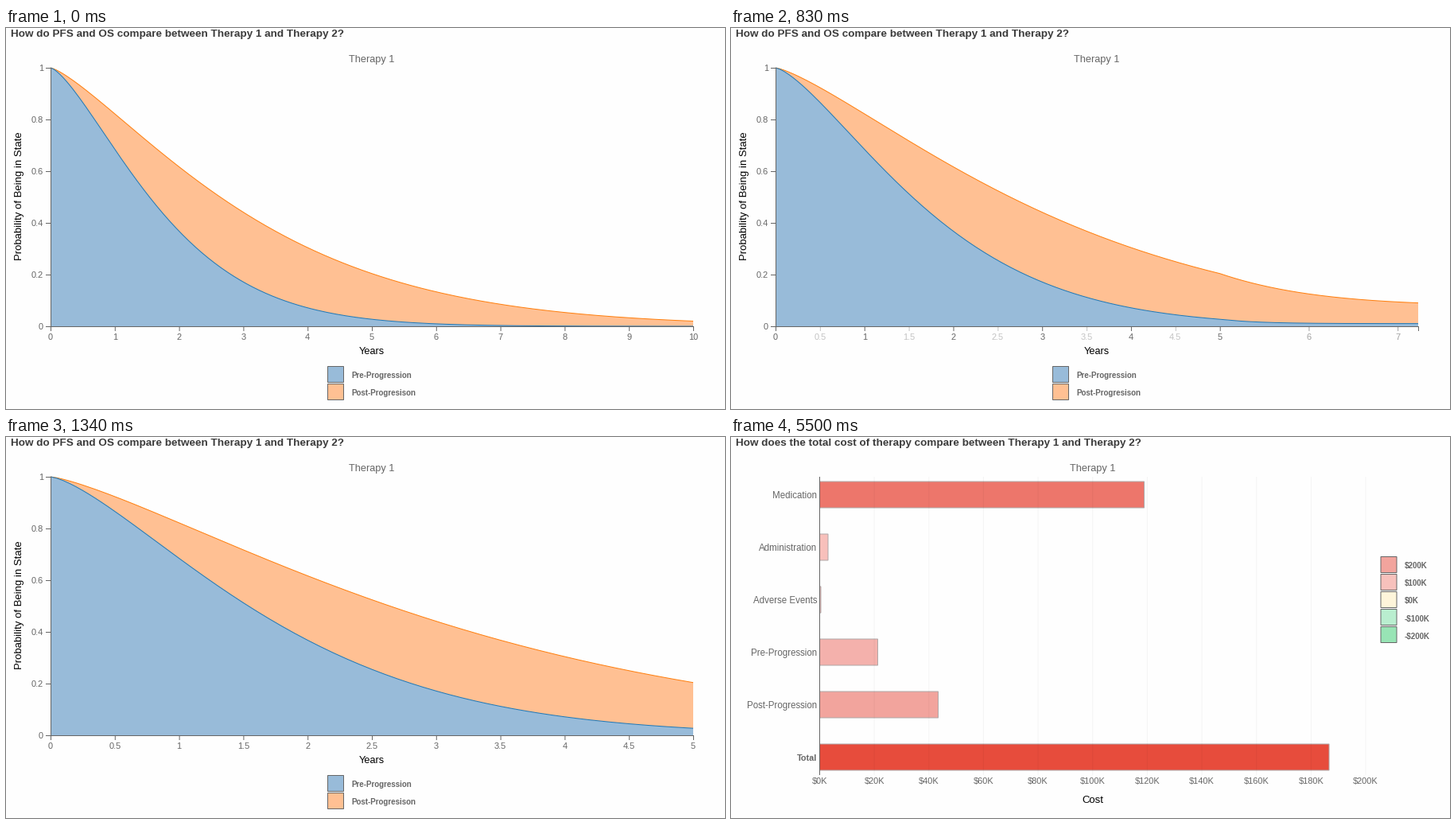
These frames come from a looping animation (904x479 px, 8000 ms). A matplotlib script:

```python
import numpy as np
import matplotlib.pyplot as plt
from matplotlib.animation import FuncAnimation
from matplotlib.patches import Polygon, Rectangle

W, H, DPI = 904, 479, 64
PX = 72 / DPI  # points per pixel
STEP, LOOP = 20, 8000
ZOOM_START, ZOOM_TIME = 384, 975
ZOOM_FIRST, ZOOM_LAST = 500, 1340
CUT, FADE_END = 5360, 5500

BG, GREY, DARK = "#fefefe", "#666666", "#3c3c3c"
BLUE, BLUE_FILL = "#1f77b4", "#98bbd9"
ORANGE, ORANGE_FILL = "#ff7f0e", "#ffc093"

plt.rcParams["font.family"] = "Liberation Sans"
plt.rcParams["path.snap"] = False
plt.rcParams["toolbar"] = "None"

fig = plt.figure(figsize=(W / DPI, H / DPI), dpi=DPI, facecolor=BG)


def stage():
    ax = fig.add_axes([0, 0, 1, 1])
    ax.set(xlim=(0, W), ylim=(H, 0))
    ax.axis("off")
    return ax


def text(ax, x, y, s, size, color=GREY, ha="center", bold=False, **kw):
    return ax.text(x, y, s, fontsize=size * PX, color=color, ha=ha,
                   va="baseline", weight="bold" if bold else "normal", **kw)


def line(ax, xs, ys, color=GREY, **kw):
    return ax.plot(xs, ys, color=color, lw=PX, solid_capstyle="butt", **kw)[0]


def box(ax, x, y, w, h, fill, edge=GREY, **kw):
    return ax.add_patch(Rectangle((x, y), w, h, fc=fill, ec=edge, lw=PX, **kw))


def legend(ax, x, y, entries):
    for i, (label, fill) in enumerate(entries):
        top = y + 22 * i
        box(ax, x, top, 20, 20, fill)
        text(ax, x + 30, top + 15, label, 9.8, ha="left", bold=True)


# --- Survival chart: curves use whole pixels, axis lines sit half a pixel in ---
X0, X1, Y0, Y1 = 56, 864, 50, 375
SPAN, HALF = X1 - X0, 0.5
AXIS_X, AXIS_Y = X0 + HALF, Y1 + HALF
survival = stage()

text(survival, 6, 11, "How do PFS and OS compare between Therapy 1 and Therapy 2?",
     13.45, DARK, "left", True)
text(survival, 460, 43, "Therapy 1", 12.7)
text(survival, 460, 410, "Years", 12.7, "black")
text(survival, 20, 211, "Probability of Being in State", 13.1, "black",
     rotation=90, rotation_mode="anchor")
legend(survival, 404.5, 425.5,
       [("Pre-Progression", BLUE_FILL), ("Post-Progresison", ORANGE_FILL)])

post_area = survival.add_patch(Polygon([(0, 0)], fc=ORANGE_FILL, lw=0))
pre_area = survival.add_patch(Polygon([(0, 0)], fc=BLUE_FILL, lw=0))
post_line = line(survival, [], [], ORANGE)
pre_line = line(survival, [], [], BLUE)

line(survival, [AXIS_X, AXIS_X], [Y0, AXIS_Y], zorder=4)
line(survival, [AXIS_X, X1 + HALF, X1 + HALF], [AXIS_Y, AXIS_Y, Y1 + 6], zorder=4)
for k in range(6):
    y = AXIS_Y - (Y1 - Y0) * k / 5
    line(survival, [X0 - 6, AXIS_X], [y, y], zorder=4)
    text(survival, 47, y + 3.5, f"{k / 5:g}", 11, ha="right")

ticks = []
for v in [k / 2 for k in range(11)] + list(range(6, 11)):
    ticks.append((v, line(survival, [0, 0], [Y1, Y1 + 6], zorder=4),
                  text(survival, 0, 392, f"{v:g}", 11, clip_on=True)))
box(survival, 889, 0, W - 889, H, BG, "none", zorder=9)

years = np.linspace(0, 10, 201)
kept = np.minimum(years, 5)


def weibull(t, scale, shape):
    return np.exp(-(t / scale) ** shape)


def ease(u):
    u = min(max(u, 0), 1)
    return 4 * u ** 3 if u < 0.5 else 1 - 4 * (1 - u) ** 3


def draw_survival(e):
    x = X0 + SPAN * ((1 - e) * years / 10 + e * kept / 5)

    def curve(scale, shape):
        p = (1 - e) * weibull(years, scale, shape) + e * weibull(kept, scale, shape)
        return Y1 - (Y1 - Y0) * p

    pre, post = curve(2, 1.4), curve(3.5, 1.3)
    pre_line.set_data(x, pre)
    post_line.set_data(x, post)
    pre_area.set_xy([*zip(x, pre), (X1, Y1), (X0, Y1)])
    post_area.set_xy([*zip(x, post), *zip(x[::-1], pre[::-1])])

    for v, mark, label in ticks:
        alpha = 1 - e if v > 5 else e if v % 1 else 1
        tx = X0 + SPAN * v * (1 + e) / 10
        mark.set_xdata([tx + HALF, tx + HALF])
        label.set_x(tx)
        for artist in (mark, label):
            artist.set_alpha(alpha)
            artist.set_visible(alpha > 0 and tx < W)


# --- Cost chart ---
C0, C_STEP = 111.5, 68.65
cost = stage()

text(cost, 6, 11, "How does the total cost of therapy compare between Therapy 1 and Therapy 2?",
     13.45, DARK, "left", True)
text(cost, 454.5, 43, "Therapy 1", 12.7)
text(cost, 454.5, 460, "Cost", 13.1, "black")

bars = [("Medication", 519.5, "#ed766b"), ("Administration", 122, "#f8c0bb"),
        ("Adverse Events", 113, "#f8c0bb"), ("Pre-Progression", 184.5, "#f4b1ac"),
        ("Post-Progression", 260.5, "#f2a49d"), ("Total", 752, "#e74c3c")]
for i, (name, end, fill) in enumerate(bars):
    mid = 72.5 + 66 * i
    total = name == "Total"
    box(cost, C0, mid - 16.5, end - C0, 33, fill, "#b0a8a8")
    text(cost, 108, mid + 4.5, name, 10.9 if total else 11.5, ha="right", bold=total)

for k in range(11):
    x = C0 + C_STEP * k
    if k:
        line(cost, [x, x], [50, 425], "black", alpha=0.04, zorder=3)
    text(cost, x, 436, f"${20 * k}K", 11)
line(cost, [C0, C0], [50, 425], zorder=4)
legend(cost, 817, 150.5,
       [("$200K", "#f2a49d"), ("$100K", "#f7c1bc"), ("$0K", "#fef5da"),
        ("-$100K", "#b9eecf"), ("-$200K", "#98e4b5")])
veil = box(cost, 0, 0, W, H, BG, "none", zorder=10)


def update(i):
    ms = i * STEP
    in_cost = ms >= CUT
    survival.set_visible(not in_cost)
    cost.set_visible(in_cost)
    if in_cost:
        opacity = 0.12 + 0.88 * (ms - CUT) / (FADE_END - CUT)
        veil.set_alpha(max(0, 1 - opacity))
        veil.set_visible(opacity < 1)
    elif ms < ZOOM_FIRST:
        draw_survival(0)
    elif ms >= ZOOM_LAST:
        draw_survival(1)
    else:
        draw_survival(ease((ms + STEP / 2 - ZOOM_START) / ZOOM_TIME))
    return []


anim = FuncAnimation(fig, update, frames=LOOP // STEP, interval=STEP,
                     repeat=True, repeat_delay=0, blit=False)
plt.show()
```
